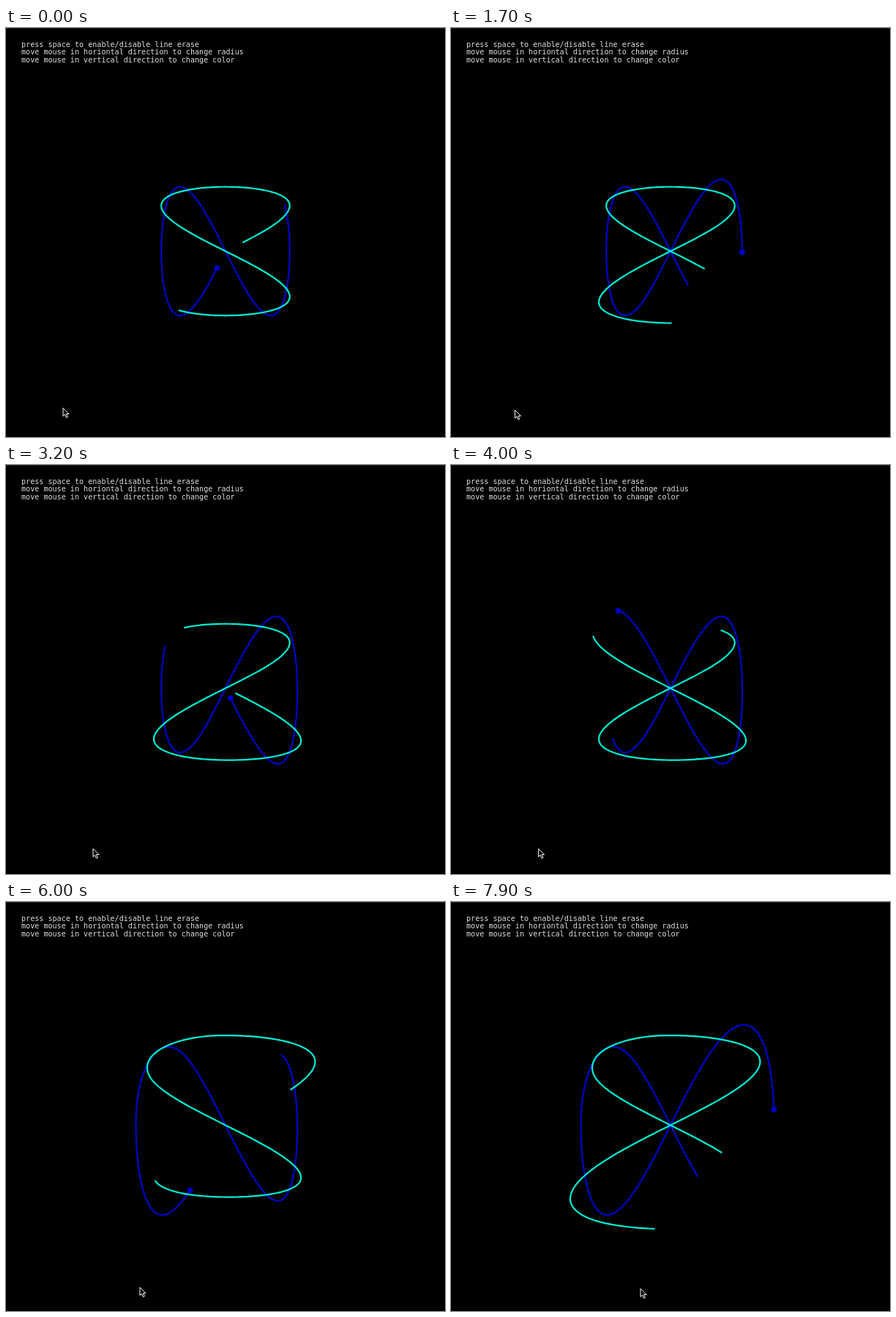
An HTML page with a canvas that plays this animation: 600x558 px, repeating every 8000 ms.

```html
<!DOCTYPE html>
<html>
<head>
<meta charset="utf-8">
<style>
html, body { margin: 0; width: 100%; height: 100%; overflow: hidden; background: #000; }
canvas { display: block; }
</style>
</head>
<body>
<canvas id="stage" width="600" height="558"></canvas>
<script>
const ctx = document.getElementById('stage').getContext('2d');
const LOOP = 8, FPS = 10, TRAIL = 5, CX = 300, CY = 304.5;
const BLUE = '#0000cc', CYAN = '#00eed4';
const HELP = [
  'press space to enable/disable line erase',
  'move mouse in horiontal direction to change radius',
  'move mouse in vertical direction to change color'
];

// eased move of the given distance between two times
function glide(t, from, to, distance) {
  const u = Math.min(1, Math.max(0, (t - from) / (to - from)));
  return distance * u * u * (3 - 2 * u);
}

const mouseX = t => 47
  + glide(t, -0.5, 0, 31)
  + glide(t, 0, 1, 9)
  + glide(t, 1.6, 3.1, 32)
  + glide(t, 3.95, 4.8, 64)
  + glide(t, 6.3, 7.65, 76);
const mouseY = x => 518 + 9 * Math.max(0, (x - 78) / 181) ** 0.4;

// the two curves share their offsets with the axes swapped
function offsets(t) {
  const r = 75.8 + 0.255 * mouseX(t), a = t - 0.122;
  return [r * Math.sin(a), -r * Math.sin(2 * a)];
}
const bluePoint = t => { const [u, v] = offsets(t); return [CX + u, CY + v]; };
const cyanPoint = t => { const [u, v] = offsets(t); return [CX + v, CY + u]; };

function trail(point, now, color) {
  ctx.beginPath();
  for (let i = 0; i <= 300; i++) ctx.lineTo(...point(now - TRAIL + TRAIL * i / 300));
  ctx.strokeStyle = color;
  ctx.lineWidth = 2.2;
  ctx.stroke();
}

function cursor(x, y) {
  ctx.save();
  ctx.translate(x, y + 0.5);
  ctx.strokeStyle = '#fff';
  ctx.lineWidth = 1;
  ctx.stroke(new Path2D('M0 0V11L2.6 8.7L4.4 13L6.3 12.2L4.5 8H8Z'));
  ctx.restore();
}

function draw(t) {
  ctx.fillStyle = '#000';
  ctx.fillRect(0, 0, 600, 558);
  ctx.fillStyle = '#222';
  ctx.fillRect(0, 0, 600, 1);

  ctx.fillStyle = '#e0e0e0';
  ctx.font = '10.1px "DejaVu Sans Mono", monospace';
  HELP.forEach((line, i) => ctx.fillText(line, 21, 26 + i * 10.3));

  trail(bluePoint, t, BLUE);
  ctx.beginPath();
  ctx.arc(...bluePoint(t), 3.8, 0, 2 * Math.PI);
  ctx.fillStyle = BLUE;
  ctx.fill();
  trail(cyanPoint, t, CYAN);
  const x = mouseX(t);
  cursor(x, mouseY(x));
}

const start = performance.now();
function tick() {
  const t = (performance.now() - start) / 1000 % LOOP;
  draw(Math.floor(t * FPS) / FPS);
  requestAnimationFrame(tick);
}
tick();
</script>
</body>
</html>
```
